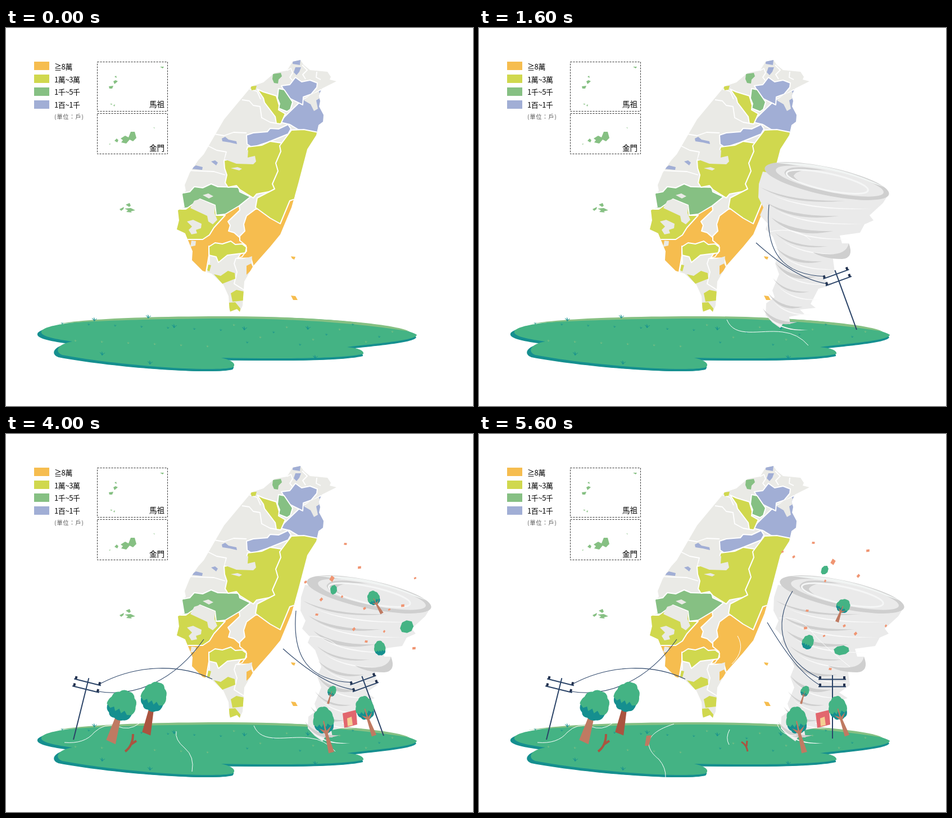
An HTML page that plays this animation: 831 by 674 pixels, repeating every 6400 ms.

```html
<!DOCTYPE html>
<html lang="zh-Hant">
<head>
<meta charset="utf-8">
<style>
html, body { margin: 0; width: 100%; height: 100%; overflow: hidden; background: #fff }
svg { display: block; width: 831px; height: 674px; font: 500 13.5px "Noto Sans CJK TC", "Noto Sans CJK", "Noto Sans", sans-serif }
.gray { fill: #eaeae6 } .orange { fill: #f6bd4f } .lime { fill: #d0d84e } .green { fill: #86c083 } .blue { fill: #a1aed5 }
.county path { stroke: #fff; stroke-width: 2; stroke-linejoin: round }
.line { fill: none; stroke: #fff }
.border { fill: none; stroke: #fff; stroke-width: 1.8; stroke-linejoin: round }
.wire { fill: none; stroke: #2b4468; stroke-width: 1.1 }
.box { fill: none; stroke: #333; stroke-dasharray: 3 2 }
.branch { fill: none; stroke: #aa5440; stroke-width: 4 }
.pale { color: #bf7a62 } .dark { color: #aa5440 }
</style>
</head>
<body>
<svg viewBox="0 0 831 674">
<defs>
  <clipPath id="coast"><path id="land" d="M510 60L524 57 530 66 541 75 572 78 578 87 576 92 588 95 562 108 556 121 559 130 557 140 565 155 564 167 556 173 552 191 536 216 520 277 508 320 488 368 470 390 440 424 424 452 421 495 416 506 411 501 398 506 396 478 387 458 366 438 350 433 331 414 332 398 319 366 304 359 308 343 306 325 318 320 314 296 320 290 318 280 327 258 342 236 352 225 388 163 437 104 458 97 478 80 500 76Z"/></clipPath>
  <path id="ground" d="M63 541C72 520 250 516 400 515S700 528 731 547C731 558 640 564 607 569C630 571 637 576 636 581C600 590 480 590 383 588C400 592 411 598 404 605C370 614 200 602 100 583C85 577 92 563 118 559C90 555 60 550 63 541Z"/>
  <g id="crown">
    <path fill="#158f8f" d="M-24 2Q-26 14-18 18Q-16 26-6 25Q2 30 10 25Q20 24 22 12L20-8Z"/>
    <path fill="#44b384" d="M-26 4Q-26-4-21-10Q-20-20-10-22Q-4-30 6-27Q16-28 19-18Q26-14 25-4Q28 4 22 12L14 14 8 8 3 14-2 7-8 13-12 6-18 10Z"/>
  </g>
  <path id="leaf" fill="#44b384" d="M-10 3L-11-3-6-10 3-13 10-7 11 2 6 9-3 12-9 8Z"/>
  <g id="tree">
    <path fill="currentColor" d="M-9 0L9 3 5-50-4-50Z"/>
    <use href="#crown" y="-67"/>
  </g>
  <g id="sapling">
    <use href="#crown" transform="translate(0 -59) scale(.73 .88)"/>
    <path fill="currentColor" d="M-5 0H5L2-34 12-47 1-40V-58H-1L-2-41-11-47-3-35Z"/>
  </g>
  <g id="pole">
    <path class="wire" style="stroke-width:2" d="M629 430V543M604 437.500H653M604 450.500H653"/>
    <path stroke="#22314e" stroke-width="4" d="M607 432v5M650 432v5M607 445v5M650 445v5"/>
  </g>
  <g id="tornado">
    <path fill="#eaeaea" d="M531 256L524 278 523 302 532 320 526 334 540 349 536 359 549 372 560 402 553 420 560 439 548 468 552 480 537 491 536 512 548 525 562 535 567 527 580 528 578 515 605 510 597 502 625 499 616 492 630 465 655 458 640 448 659 435 655 405 687 396 684 384 672 384 668 370 704 365 712 350 728 343 721 334 745 312 755 296Z"/>
    <g id="swirls"></g>
    <g transform="rotate(12 645 273)">
      <ellipse cx="645" cy="273" rx="113" ry="25" fill="#cfcfcf"/>
      <path fill="#f1f4f3" d="M548 260Q645 236 748 262Q645 250 548 260Z"/>
      <ellipse cx="650" cy="272" rx="98" ry="19" fill="#eaeaea"/>
      <path fill="#cfcfcf" d="M568 274Q570 256 640 255Q590 260 585 276Q595 288 640 290Q575 289 568 274Z"/>
      <ellipse cx="646" cy="274" rx="74" ry="15" fill="none" stroke="#f5f6f6" stroke-width="3"/>
    </g>
  </g>
  <g id="house">
    <path fill="#8e3a59" d="M302 508L325 509 318 538 295 537Z"/>
    <path fill="#e2676e" d="M325 509L356 512 351 535 318 538Z"/>
    <path fill="#f5cf92" d="M305 520L314 519 312 537 302 537Z"/>
    <path fill="#fff" d="M326 520h6l-2 8h-5z"/>
  </g>
  <g id="roof">
    <path fill="#8e3a59" d="M309 485L324 470 330 485Z"/>
    <path fill="#f5946f" d="M324 470L355 481 364 496 330 485Z"/>
  </g>
</defs>

<g id="legend"></g>
<rect class="box" x="162.500" y="60.500" width="125" height="88"/>
<rect class="box" x="162.500" y="152.500" width="125" height="72"/>
<text x="255" y="140.500">馬祖</text><text x="255" y="219">金門</text>
<path class="green" d="M274 69l7 0-2 3zM193 87l3-2 1 4zM191 95l4-2 4 2-6 5zM183 104l8-1-2 5-5 0zM185 135l4 0-1 2zM191 138l3-2-1 4z"/>
<path class="green" d="M204 197L212 192 218 195 222 185 229 185 232 196 226 202 220 199 214 206 205 204 208 200ZM193 201l4-4 3 3-2 4zM183 207l3-1-1 2zM262 177l3 1-1 1z"/>
<path class="green" d="M202 323l8-4-1 4-4 3zM213 315l7-3 2 5-3 2zM211 322l11-1 8 4-8 2 2 2-10-1 3-3z"/>

<use href="#land" class="gray"/>
<g clip-path="url(#coast)">
  <path class="border" d="M500 76L507 72 510 80 505 88 510 94M527 66L536 75 528 83 533 91M553 78L552 88 560 92M433 109L447 113 453 127M420 128L433 130 440 138 452 140 455 160 470 168 481 170M370 189L388 192 405 186 428 187M359 210L375 218 392 221 388 238M327 254L370 256 390 262"/>
  <g class="county">
    <path class="blue" d="M488 168L496 158 525 130 560 110 570 130 570 180 551 187 520 181 505 172Z"/>
    <path class="blue" d="M490 103L505 101 515 88 526 96 541 93 554 98 553 106 543 118 529 123 528 137 502 124Z"/>
    <path class="green" d="M485 108L495 110 510 132 506 145 500 149 485 143 487 135 483 125Z"/>
    <path class="lime" d="M447 109L458 114 481 121 486 138 485 146 497 153 489 171 481 170 479 158 460 133 458 125Z"/>
    <path class="blue" d="M428 191L440 187 465 185 470 179 485 180 502 172 507 180 502 189 465 204 438 213 429 207Z"/>
    <path class="orange" d="M310 365L345 365 390 325 415 317 416 325 395 345 399 352 396 362 406 365 424 381 424 390 362 400 356 435 340 440Z"/>
    <path class="orange" d="M444 323L470 320 500 290 520 302 510 380 440 425 436 410 412 411 417 403 428 398 427 388 416 379 416 371 425 362 423 350 428 335Z"/>
    <path class="green" d="M305 296L327 292 335 283 350 285 365 278 377 283 414 284 416 292 435 301 415 317 390 332 372 334 345 318 305 323Z"/>
    <path class="lime" d="M300 323L320 323 345 305 372 316 374 334 390 334 370 356 362 369 350 377 323 377 300 372Z"/>
    <path class="lime" d="M388 236L425 229 430 212 455 209 470 202 490 205 492 250 478 290 446 296 440 303 416 288 410 281 395 284 390 276 393 262 389 250Z"/>
    <path class="lime" d="M489 220L487 210 508 182 530 181 560 187 560 260 520 303 505 308 488 349 470 339 444 320 447 303 478 287 474 278 484 255 480 241Z"/>
    <path class="lime" d="M361 390L372 383 385 385 400 380 408 386 420 385 428 391 426 401 394 405 378 418 374 408 361 405Z"/>
  </g>
  <path class="border" d="M427 398L420 408 409 411 406 420 411 435 406 456 425 468M361 388L362 418 356 436"/>
  <path class="gray" d="M530 129L542 119 557 113 560 124 552 129 555 144 548 148 542 136ZM389 234L393 222 405 214 431 218 430 231 443 228 445 238 440 243 410 242ZM400 250L412 248 420 251 415 254Z"/>
  <path class="gray" d="M350 298L360 295 369 300 361 304ZM328 321L335 308 345 305 372 317 371 330 376 342 368 350 360 345 358 335ZM322 345L333 342 348 349 347 357 338 360 340 366 330 368 325 360 331 354ZM330 379L338 380 337 388 328 390ZM418 413L438 407 437 416 430 430 419 430Z"/>
  <path class="blue" d="M511 55L524 57 523 66 510 64ZM515 70L525 70 522 78 517 84 512 79ZM384 197L390 194 396 199 410 202 411 207 398 204 385 202ZM365 238L372 236 377 240 374 245ZM329 251L338 245 350 248 349 253Z"/>
  <path class="green" d="M475 82L489 80 491 86 485 92 484 99 477 98 474 91Z"/>
  <path class="lime" d="M435 104L446 103 444 110 437 111ZM370 439L382 442 395 433 407 437 408 447 385 456ZM358 432L360 422 365 423 362 434ZM400 473L410 467 424 470 422 486 403 488ZM394 490L408 489 417 500 416 510 400 508Z"/>
  <path class="orange" d="M428 424L436 420 440 428 428 440Z"/>
</g>
<path class="orange" d="M507 407l8 1-2 5-4-2zM507 477l8 1 4 7-8 0z"/>

<use href="#ground" x="-7" y="4" fill="#158f8f"/><use href="#ground" x="-1" y="4" fill="#158f8f"/>
<use href="#ground" fill="#44b384"/>
<path class="green" d="M88 528C150 517 270 514 400 514S690 526 718 541C620 525 500 518 400 518S150 521 88 528Z"/>
<g id="grass"></g>

<use href="#tornado" data-on="1"/>
<use href="#tornado" x="-26" data-on="2"/>
<use href="#tornado" x="1" y="13" data-on="34567"/>

<path class="line" data-on="137" d="M534 328Q570 325 590 350T660 415M460 360Q475 385 450 410M531 518Q540 540 565 537"/>
<path class="line" data-on="2456" d="M441 520C455 555 500 537 540 542Q568 545 586 566M517 363Q565 354 590 378"/>
<path class="line" data-on="47" d="M446 527Q438 542 445 554"/>

<g data-on="137">
  <use href="#pole"/>
  <path class="wire" d="M558 280C520 340 540 405 607 436M513 336C545 390 575 430 607 448"/>
</g>
<g data-on="2456">
  <use href="#pole" transform="translate(43 -5) rotate(-20 629 543)"/>
  <path class="wire" d="M516 315C508 400 540 440 616 443M493 383C540 425 580 450 619 456"/>
</g>

<g data-on="3457">
  <path class="line" d="M104 550Q140 553 157 532Q175 515 197 521Q220 530 237 516"/>
  <use href="#pole" transform="translate(-509 2) rotate(14 629 543)"/>
  <path class="wire" d="M168 445C235 410 310 410 367 437M164 459C230 470 300 440 352 366"/>
</g>
<path class="line" data-on="4" d="M303 540Q300 555 318 570T331 612"/>
<path class="line" data-on="35" d="M303 530Q300 545 318 560T331 602"/>
<g data-on="357">
  <use href="#tree" class="pale" transform="translate(187 548) rotate(16)"/>
  <use href="#tree" class="dark" transform="translate(250 533) rotate(11) scale(.88 .98)"/>
  <path class="branch" d="M212 566Q226 556 226 535M223 553L232 547"/>
</g>
<g data-on="4">
  <use href="#tree" class="pale" transform="translate(185 538) rotate(30)"/>
  <use href="#tree" class="dark" transform="translate(253 538) rotate(20) scale(.88 .98)"/>
  <path class="branch" d="M205 562Q222 555 226 535M217 549L230 545"/>
  <path class="branch" style="stroke:#bf7a62" d="M290 571Q300 562 302 546M298 556L309 550"/>
  <use href="#roof"/>
</g>
<use href="#house" data-on="34"/>
<use href="#roof" x="-6" y="23" data-on="3"/>
<g data-on="7">
  <path class="line" d="M347 517C290 535 295 560 320 580Q333 595 332 613"/>
  <path fill="#bf7a62" d="M295 556L298 538 307 537 302 556Z"/>
  <path class="branch" style="stroke-width:3" d="M478 566Q476 554 467 549M476 557L477 547"/>
</g>
<path class="branch" style="stroke-width:3" data-on="6" d="M459 531Q460 522 454 514M459 523L461 515"/>

<g data-on="456">
  <use href="#sapling" class="pale" transform="translate(669 320) rotate(-29) scale(.6 .53)"/>
  <use href="#leaf" transform="translate(583 278) scale(.55 .7)"/>
  <use href="#leaf" transform="translate(713 344) rotate(30)"/>
  <use href="#crown" transform="translate(665 382) rotate(-15) scale(.4 .48)"/>
</g>
<g data-on="37">
  <use href="#sapling" class="pale" transform="translate(637 335) rotate(21) scale(.65 .52)"/>
  <use href="#leaf" transform="translate(615 243) rotate(20) scale(.55 .7)"/>
  <use href="#leaf" transform="translate(645 386) scale(1.250 .7)"/>
  <use href="#crown" transform="translate(585 371) rotate(15) scale(.4 .48)"/>
</g>
<g id="debris" fill="#f09572"></g>

<g data-on="6">
  <use href="#sapling" class="pale" transform="translate(573 472) rotate(27) scale(.42)"/>
  <path fill="#e2676e" d="M594 495L619 494 614 520 588 521Z"/><path fill="#f5cf92" d="M599 505L608 504 606 520 597 520Z"/>
  <use href="#sapling" class="pale" transform="translate(558 558)"/>
  <use href="#sapling" class="dark" transform="translate(640 548) rotate(-6) scale(.86)"/>
</g>
<g data-on="57">
  <use href="#sapling" class="pale" transform="translate(573 481) rotate(17) scale(.4)"/>
  <path fill="#e2676e" d="M599 498L623 492 625 518 602 524Z"/><path fill="#f5cf92" d="M607 507L615 504 617 519 608 521Z"/>
  <use href="#sapling" class="pale" transform="translate(579 568) rotate(-14)"/>
  <use href="#sapling" class="pale" transform="translate(655 538) rotate(-19) scale(.88)"/>
</g>
</svg>
<script>
const el = id => document.getElementById(id);
const add = (id, items, draw) => el(id).innerHTML += items.map(draw).join('');
const count = n => [...Array(n).keys()];

add('legend', [['orange', '≧8萬'], ['lime', '1萬~3萬'], ['green', '1千~5千'], ['blue', '1百~1千']], ([color, label], i) =>
  `<rect class="${color}" x="50" y="${60 + 23 * i}" width="27" height="15"/>
   <text x="86" y="${74 + 22.7 * i}" font-size="13" letter-spacing="-.4">${label}</text>`);
el('legend').innerHTML += '<text x="86" y="162" font-size="10" font-weight="400" letter-spacing="1" fill="#555">(單位：戶)</text>';

// Tapered bands that follow the narrowing funnel
const band = (color, x, y, width, thick) =>
  `<path fill="${color}" d="M${x} ${y}q${width * .35} 26 ${width} 24q${-width * .65} ${thick} ${-width}-24"/>`;
add('swirls', count(9), i => {
  const t = i / 8, y = 284 + 216 * t;
  const left = 527 + 28 * Math.sin(3 * t), width = 210 - 260 * t + 135 * t * t;
  return band('#cfcfcf', left, y, width * .72, 9 + i % 3 * 3) + band('#fafafa', left + width * .1, y + 14, width * .85, 6);
});
el('swirls').innerHTML += '<path fill="#cfcfcf" d="M620 400Q678 412 684 384Q694 410 672 412Q640 412 620 400Z"/>';

const tuft = (color, size, x, y) =>
  `<path transform="translate(${x} ${y}) scale(${size})" fill="${color}" d="M-5-2Q-1-1 0 3L-1-4Q2-1 1 3Q3-1 6-1Q3 1 1 4H-1Q-2 0-5-2"/>`;
add('grass', [[157, 519], [253, 514], [299, 531], [424, 535], [537, 534], [550, 586], [256, 596], [171, 580]],
  ([x, y]) => tuft('#158f8f', .9, x, y));
add('grass', count(26), i => {
  const x = 100 + i * 23.5;
  return tuft(i % 2 ? '#86c083' : '#158f8f', .5, x, 526 + i * 31 % (x < 390 ? 60 : 40));
});

const scatter = (on, points, dy = 0) => `<g data-on="${on}">` + points.map(([x, y], i) =>
  `<path transform="translate(${x} ${y + dy}) rotate(${i * 67 % 80 - 40}) scale(${i ? .75 + i % 3 * .15 : 1.6})" d="M-3-1L2-3 3 1-2 3Z"/>`).join('') + '</g>';
const low = [[580, 258], [604, 196], [629, 238], [728, 257], [533, 264], [561, 295], [598, 290], [553, 322], [706, 306], [682, 313], [638, 311], [619, 348], [673, 352], [641, 370], [726, 382]];
const high = [[630, 228], [595, 194], [692, 208], [540, 210], [560, 219], [675, 253], [616, 262], [584, 315], [581, 346], [614, 360], [650, 342], [670, 356], [724, 342], [625, 419]];
el('debris').innerHTML = scatter('3', high, 11) + scatter('456', low) + scatter('7', high);

const parts = document.querySelectorAll('[data-on]');
function tick() {
  const step = Math.floor(performance.now() / 800) % 8;
  for (const part of parts) part.style.display = part.dataset.on.includes(step) ? '' : 'none';
  requestAnimationFrame(tick);
}
tick();
</script>
</body>
</html>
```
